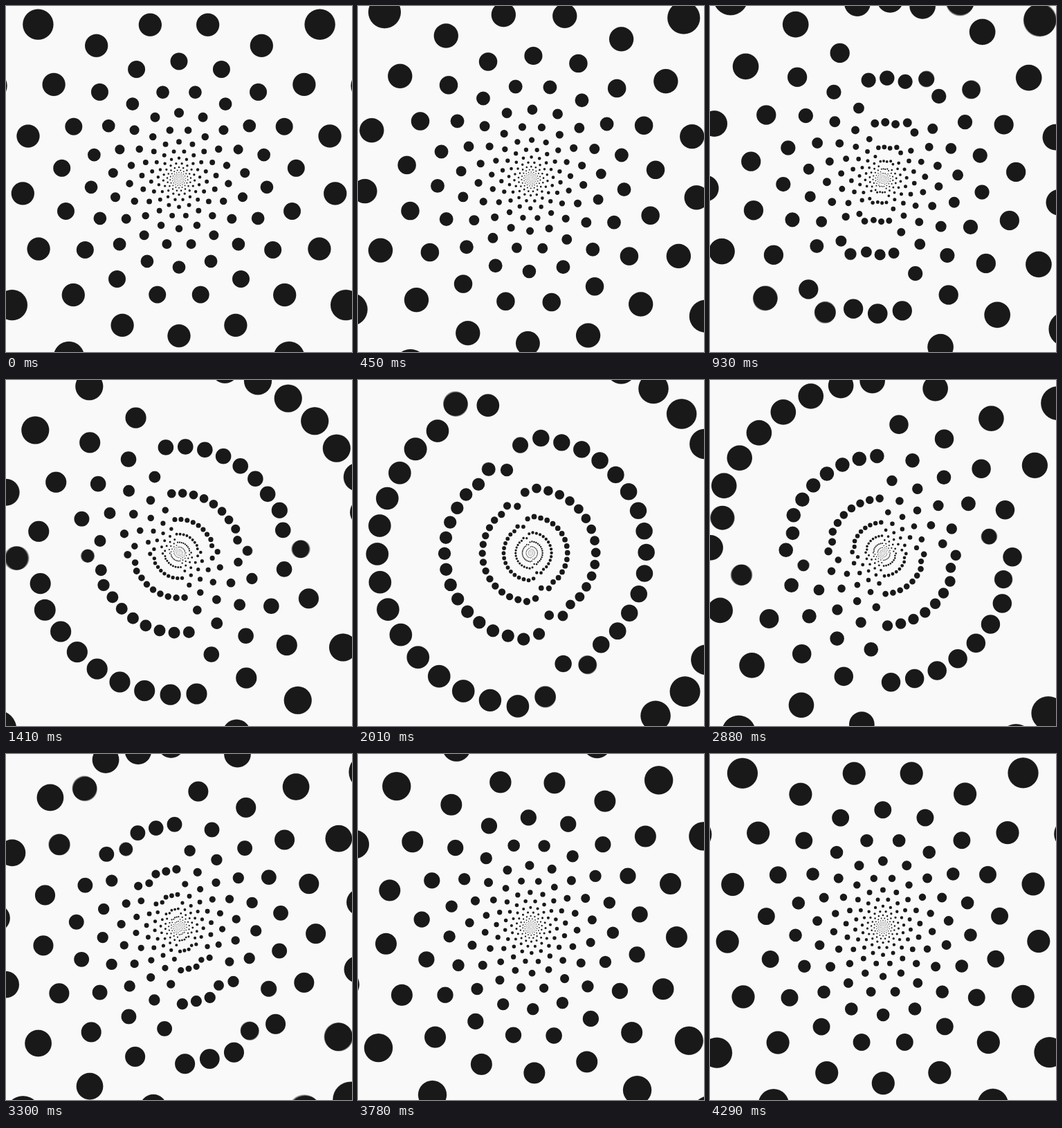
Animation, 500 px wide and 500 px high, one loop 4.32 s. Source, as an HTML page with a canvas:

```html
<!DOCTYPE html>
<html>
<head>
<meta charset="utf-8">
<style>
  html, body { margin: 0; width: 100%; height: 100%; overflow: hidden; background: #f9f9f9; }
  canvas { display: block; }
</style>
</head>
<body>
<canvas id="stage" width="500" height="500"></canvas>
<script>
const ctx = document.getElementById('stage').getContext('2d');
const TAU = Math.PI * 2;
const STEP = 30, FRAMES = 144;      // ms per step, steps per loop
const DOTS = 17, RATIO = 4 / 3;     // dots per ring, radius ratio between rings
const SAMPLES = 5, SHUTTER = 0.6;   // motion blur

const ease = x => x < 0.5 ? 4 * x ** 3 : 1 - 4 * (1 - x) ** 3;
const clamp = x => Math.min(1, Math.max(0, x));

// Rings grow by two levels per loop while each dot in turn hops one level inward.
function drawDots(t) {
  const turn = t * TAU / DOTS / 2;
  ctx.beginPath();
  for (let j = 0; j < DOTS; j++) {
    const hop = ease(clamp((t - 0.0586 - 0.0414 * j) / 0.2));
    for (let level = -20; level <= 3; level++) {
      const r = 170 * RATIO ** (level + 2 * t - hop);
      const a = turn + level * Math.PI + j * TAU / DOTS;
      const x = 250 + r * Math.sin(a), y = 250 - r * Math.cos(a);
      const size = r * 0.0735;
      ctx.moveTo(x + size, y);
      ctx.arc(x, y, size, 0, TAU);
    }
  }
  ctx.fill();
}

function render(ms) {
  const step = Math.floor(ms / STEP) % FRAMES;
  ctx.clearRect(0, 0, 500, 500);
  ctx.globalCompositeOperation = 'lighter';   // sums sample coverage
  ctx.globalAlpha = 1 / SAMPLES;
  ctx.fillStyle = '#191919';
  for (let i = 0; i < SAMPLES; i++) {
    const shift = ((i + 0.5) / SAMPLES - 0.5) * SHUTTER;
    drawDots((step + shift) / FRAMES);
  }
}

const start = performance.now();
function tick() {
  render(performance.now() - start);
  requestAnimationFrame(tick);
}
tick();
</script>
</body>
</html>
```
